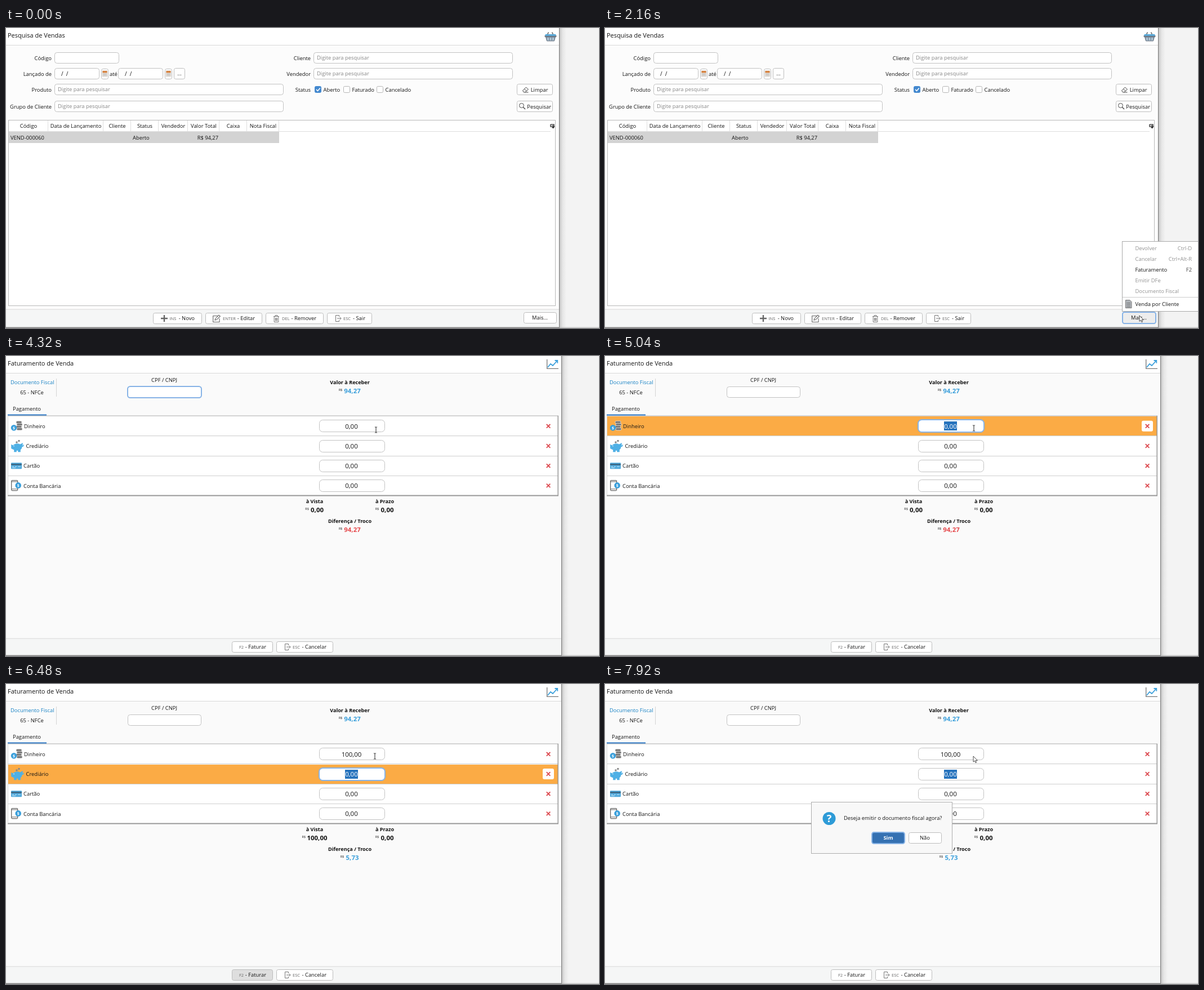
Recreate the animation shown at these times as an HTML page. Size 1053x532 px, loop 8 s.

```html
<!DOCTYPE html>
<html lang="pt-BR">
<head>
<meta charset="utf-8">
<title>Faturamento de Venda</title>
<style>
html, body { margin: 0; width: 100%; height: 100%; overflow: hidden; background: #f3f3f3; }
svg { display: block; width: 1053px; height: 532px; }
text { font-family: "Open Sans", "Noto Sans", sans-serif; white-space: pre; }
</style>
</head>
<body>
<svg id="stage" viewBox="0 0 1053 532"></svg>
<script>
const STEP = 720, LOOP = 8000;
const INK = '#141414', GRAY = '#666', BLUE = '#3571b2', SKY = '#3a9fdb';
const stage = document.getElementById('stage');

// y is the middle of the capital letters; baselines sit on whole pixels
function text(x, y, label, { size = 9.4, color = INK, anchor = 'start', bold = false } = {}) {
  return `<text x="${x}" y="${Math.round(y + size * 0.36)}" font-size="${size}" fill="${color}"
    text-anchor="${anchor}" font-weight="${bold ? 700 : 400}">${label}</text>`;
}
const center = (x, y, label, opt) => text(x, y, label, { ...opt, anchor: 'middle' });
const right = (x, y, label, opt) => text(x, y, label, { ...opt, anchor: 'end' });
const rect = (x, y, w, h, fill, more = '') =>
  `<rect x="${x}" y="${y}" width="${w}" height="${h}" fill="${fill}" ${more}/>`;
const box = (x, y, w, h, r = 4, fill = '#fff', line = '#bdbdbd', weight = 1) =>
  rect(x + .5, y + .5, w - 1, h - 1, fill, `rx="${r}" stroke="${line}" stroke-width="${weight}"`);
const path = (d, line, weight = 1, fill = 'none') =>
  `<path d="${d}" stroke="${line}" stroke-width="${weight}" fill="${fill}"/>`;
const circle = (x, y, r, fill, more = '') => `<circle cx="${x}" cy="${y}" r="${r}" fill="${fill}" ${more}/>`;
const at = (x, y, content) => `<g transform="translate(${x} ${y})">${content}</g>`;

const focusRing = (x, y, w, h, r, fill) => box(x - .5, y - .5, w + 1, h + 1, r + .5, fill, '#87b3e6', 2);

function input(x, y, w, h, { hint = '', focused = false, r = 4 } = {}) {
  return (focused ? focusRing(x, y, w, h, r, '#fff') : box(x, y, w, h, r, '#fff', '#c2c2c2'))
    + text(x + 6, y + h / 2, hint, { color: '#858585' });
}

const pointer = (x, y) =>
  at(x, y, path('M0 0V10.2L2.4 8.1 4 11.7 5.6 11 4.1 7.5H7.3Z', '#222', .8, '#fff'));
const beam = (x, y) =>
  at(x, y, path('M-2-5H-.6L0-4.4 .6-5H2M0-4.5V4.5M-2 5H-.6L0 4.4 .6 5H2', '#222'));
const clickHalo = (x, y) => circle(x, y, 10, '#f6e71d', 'opacity=".72"');

function windowFrame(title, edge, footer, body) {
  return `<defs><linearGradient id="shade"><stop stop-color="#c9c9c9"/>
    <stop offset=".45" stop-color="#e6e6e6"/><stop offset="1" stop-color="#f3f3f3"/></linearGradient></defs>`
    + rect(0, 0, 1053, 532, '#f3f3f3') + rect(edge, 0, 12, 532, 'url(#shade)')
    + rect(0, 0, edge, 532, body) + rect(0, 0, edge, 30, '#fff') + rect(0, 30, edge, 1, '#d9d9d9')
    + rect(0, footer, edge, 531 - footer, '#f5f6f6') + rect(0, footer - .5, edge, 1, '#dadada')
    + rect(edge - 1, 0, 1.2, 532, '#808080') + rect(0, 530.6, 1053, 1, '#b5b5b5')
    + rect(0, 530.6, edge, 1.4, '#858585') + text(3, 13, title, { size: 11 });
}

const icons = {
  basket: path('M3 8L7 .5M17 8L13 .5', '#777', 1.6) + rect(0, 6, 21, 3, '#6d7884', 'rx="1"')
    + path('M2 9H19L17 16H4Z', '#707b88', 1, '#8aa0b2') + rect(1, 4, 19, 3, '#57aadb', 'rx="1"')
    + path('M6 10V15M10.5 10V15M15 10V15', '#d5e4ee', 1.2),
  chart: path('M.7 0V16.3H21', '#777', 1.3) + path('M2 14L7 8 11 11 19 2M14.5 2H19.3V6.8', SKY, 1.8),
  calendar: rect(0, 0, 8, 10, '#e6e1dc', 'stroke="#c4bdb5" stroke-width=".6"') + rect(0, 0, 8, 3.5, '#d78442')
    + path('M1 5.5H7M1 7.7H7', '#aaa', .8),
  eraser: path('M1 7L7 1 11 5 5 10H3ZM4 4L8 8M5 10H11', '#444'),
  search: '<circle cx="4.5" cy="4.5" r="4" fill="none" stroke="#444"/>' + path('M7.3 7.3L11 11', '#444', 1.3),
  plus: path('M6 0V12M0 6H12', GRAY, 2.4),
  pencil: path('M9 1.5H.7V12.5H12V6M4 9L5 6.2 11 0 13.3 2.2 7 8.3Z', GRAY, 1.1),
  trash: path('M0 2.5H10M3 2V.5H7V2M1.2 3V12.5H8.8V3M3.5 5V10.5M5 5V10.5M6.5 5V10.5', '#777'),
  exit: path('M6.5 3V.5H.5V11.5H6.5V9M3 6H10M7.8 3.6L10.2 6 7.8 8.4', '#777'),
  sheet: path('M.5 .5H8L11 3.5V14.5H.5Z', '#777', 1, '#b3b8bd') + path('M2.5 5H9M2.5 7.5H9M2.5 10H9M2.5 12.5H9', '#666', .8),
  coins: [0, 4, 8, 12].map(y => rect(9 + y % 8 / 4, y, 10, 4.4, '#777', 'rx="2" stroke="#eee" stroke-width=".7"')).join('')
    + circle(5, 12, 5.2, SKY) + center(5, 12, '$', { size: 7, color: '#fff', bold: true }),
  pig: '<ellipse cx="11" cy="13" rx="8.5" ry="6.3" fill="#4fb0e5"/>'
    + path('M4 11L1 9.5V15L5 17M6 17V21H9V17M13 17V21H16V16M16 9L20 7 19 12M19 12Q22 12 22 9', '#4fb0e5', 1.6, '#4fb0e5')
    + circle(14, 2, 1.8, '#888') + circle(10, 4.5, 1.8, '#888') + circle(5, 11, .8, '#fff'),
  card: rect(0, 0, 19, 11, '#4fa9dc', 'rx="1"') + rect(0, 2, 19, 2.3, '#3b617c')
    + path('M2 7H5M7 7H10M12 7H17M2 9H8', '#d8eefa', .9),
  phone: rect(.7, .7, 11, 18, '#fff', 'rx="1.5" stroke="#666" stroke-width="1.3"') + path('M1 3H11M1 16H11', GRAY)
    + circle(12.7, 9.5, 5.3, SKY) + center(12.7, 9.5, '$', { size: 7, color: '#fff', bold: true }),
};

function actionButton(x, y, w, icon, iconX, key, keyX, label, end, fill = '#fff') {
  return box(x, y, w, 20, 3, fill) + (icon ? at(iconX, y + 4, icons[icon]) : '')
    + text(keyX, y + 10.5, key, { size: 7.5, color: '#666' }) + right(end, y + 10, '- ' + label);
}

function checkbox(x, label, checked) {
  return box(x, 103, 12, 12, 2, checked ? '#4489cf' : '#fff', checked ? '#4489cf' : '#b5b5b5')
    + (checked ? path(`M${x + 3} 109l2.5 2.6 4.3-5`, '#fff', 1.5) : '') + text(x + 15.5, 109.5, label);
}

function moreButton(step) {
  const pressed = step === 2;
  const fill = pressed ? BLUE : step === 1 || step === 3 ? '#ededed' : '#fff';
  return (step > 1 ? focusRing(919, 504, 59, 20, 3, fill) : box(919, 504, 59, 20, 3, fill))
    + center(948, 514, 'Mais...', { color: pressed ? '#fff' : INK, bold: pressed });
}

function menu(highlighted) {
  const entries = [['Devolver', 'Ctrl-D'], ['Cancelar', 'Ctrl+Alt-R'], ['Faturamento', 'F2'], ['Emitir DFe', ''], ['Documento Fiscal', '']];
  return rect(918.5, 378.5, 140, 124, '#fff', 'stroke="#aaa"')
    + (highlighted ? rect(919, 419, 134, 19, '#e4e4e4') + rect(918, 419, 3, 19, BLUE) : '')
    + entries.map(([name, key], i) => {
      const y = 391 + i * 19, color = i === 2 ? INK : '#929292';
      return text(941.5, y, name, { color }) + right(1042, y, key, { color: i === 2 ? '#444' : '#929292' });
    }).join('')
    + rect(919, 477, 134, 1, '#ccc') + at(924, 482, icons.sheet) + text(941.5, 489.5, 'Venda por Cliente');
}

function searchScreen(step) {
  const hint = 'Digite para pesquisar';
  const labels = [[81, 53, 'Código'], [81, 81, 'Lançado de'], [81, 109, 'Produto'], [81, 139, 'Grupo de Cliente'],
    [541, 53, 'Cliente'], [541, 81, 'Vendedor'], [541, 109, 'Status']];
  const columns = [['Código', 75], ['Data de Lançamento', 173], ['Cliente', 222], ['Status', 271],
    ['Vendedor', 323], ['Valor Total', 379], ['Caixa', 428], ['Nota Fiscal', 485]];
  let left = 5, header = '';
  for (const [name, edge] of columns) {
    header += center((left + edge) / 2, 174, name) + rect(edge - 1, 164, 1, 20, '#dedede');
    left = edge;
  }
  const date = x => input(x, 71, 80, 20) + text(x + 12, 81.5, '/  /', { size: 10 });
  const calendar = x => box(x, 72, 13, 19, 3) + at(x + 2.5, 76, icons.calendar);
  return windowFrame('Pesquisa de Vendas', 983, 499, '#fcfcfc')
    + at(956.5, 7, icons.basket)
    + labels.map(([x, y, name]) => right(x, y + .5, name)).join('')
    + input(86, 43, 115, 20) + date(86) + calendar(169) + text(184, 81.5, 'até') + date(199) + calendar(282)
    + box(298, 71, 20, 20, 3) + center(308, 81, '...')
    + input(86, 99, 407, 20, { hint }) + input(86, 129, 407, 20, { hint })
    + input(546, 43, 354, 20, { hint }) + input(546, 71, 354, 20, { hint })
    + checkbox(548, 'Aberto', true) + checkbox(599, 'Faturado') + checkbox(658, 'Cancelado')
    + box(907, 99, 64, 20, 3) + at(916.5, 104, icons.eraser) + right(962.5, 109.5, 'Limpar')
    + box(907, 129, 64, 20, 3) + at(911, 133, icons.search) + right(968, 139.5, 'Pesquisar')
    + box(4, 163, 972, 330, 0, '#fff', '#b9b9b9') + rect(5, 183, 962, 1, '#dedede') + header
    + path('M967 171H973V175.5H970M967 171V175H969M969 173H973M969.5 175L971.5 177.5 973.5 175Z', '#111', 1.2)
    + rect(5, 184, 480, 20, '#d3d3d3')
    + text(8, 194.5, 'VEND-000060') + text(225, 194.5, 'Aberto') + right(377, 194.5, 'R$ 94,27')
    + actionButton(261, 505, 87, 'plus', 275, 'INS', 290.5, 'Novo', 335)
    + actionButton(354, 505, 101, 'pencil', 367, 'ENTER', 385, 'Editar', 442)
    + actionButton(461, 505, 103, 'trash', 475, 'DEL', 490, 'Remover', 551)
    + actionButton(570, 505, 80, 'exit', 585, 'ESC', 599, 'Sair', 638)
    + moreButton(step)
    + (step >= 3 ? menu(step >= 4) : '')
    + (step === 2 ? clickHalo(949, 510) : step === 5 ? clickHalo(964, 431) : '')
    + (step >= 4 ? pointer(964, 431) : step ? pointer(949, 510) : '');
}

function money(x, y, label, value, color = '#111') {
  const half = value.length * 2.9;
  return center(x, y, label, { size: 9.1, bold: true, color: '#111' })
    + right(x + 1.5 - half, y + 13.5, 'R$', { size: 5.5 })
    + center(x + 4.5, y + 15.5, value, { size: 11.4, bold: true, color });
}

function paymentRow(i, step) {
  const [name, icon, iconTop, labelX] = [['Dinheiro', 'coins', 9, 32], ['Crediário', 'pig', 11, 35.5],
    ['Cartão', 'card', 5.5, 31], ['Conta Bancária', 'phone', 10, 31]][i];
  const y = 124.3 + i * 35.2, top = Math.round(y - 17);
  const current = step === 7 ? 0 : step >= 8 ? 1 : -1;
  const selected = i === current, active = selected && step < 10;
  const value = i === 0 && step >= 8 ? '100,00' : '0,00';
  return rect(4, top, 976, 34, active ? '#fbab45' : '#fff') + rect(4, top + 34, 976, 1, '#cfcfcf')
    + at(9, y - iconTop, icons[icon]) + text(labelX, y + .3, name)
    + input(556, Math.round(y) - 11, 117, 22, { focused: active, r: 6 })
    + (selected ? rect(602, Math.round(y) - 8, 23, 16, '#2673bd') : '')
    + center(613.5, y + .3, value, { size: 11.5, color: selected ? '#fff' : INK })
    + (active ? rect(953, y - 9.5, 20, 19, '#fff', 'rx="3"') : '')
    + path(`M959.8 ${y - 3.3}l6.6 6.6m0-6.6l-6.6 6.6`, '#dc4a50', 1.8);
}

function dialog(pressed) {
  return rect(366.5, 209.5, 250, 91, '#f8f8f8', 'stroke="#adadad"')
    + circle(398, 238.5, 11.5, '#2e9bd7') + center(398, 238.5, '?', { size: 18, color: '#fff', bold: true })
    + text(424, 237.5, 'Deseja emitir o documento fiscal agora?')
    + focusRing(474, 263, 58, 20, 3, pressed ? BLUE : '#4a87c7')
    + center(503, 273, 'Sim', { color: '#fff', bold: true })
    + box(539, 263, 59, 20, 3) + center(568, 273, 'Não');
}

function billingScreen(step) {
  const paid = step >= 8;
  return windowFrame('Faturamento de Venda', 987, 501, '#fafafa')
    + at(960, 6, icons.chart)
    + text(8, 47, 'Documento Fiscal', { color: '#1681c4' }) + center(46, 64.5, '65 - NFCe') + rect(89, 40, 1, 32, '#d4d4d4')
    + center(281, 42.5, 'CPF / CNPJ') + input(216, 54, 131, 20, { focused: step === 6 })
    + money(610.5, 46.5, 'Valor à Receber', '94,27', SKY)
    + text(12, 93.5, 'Pagamento') + rect(3, 105.5, 978, 1.2, '#bcbcbc') + rect(3, 103.5, 69, 2, '#2f78c4')
    + [0, 1, 2, 3].map(i => paymentRow(i, step)).join('')
    + rect(3, 246.5, 978, 2, '#999') + rect(979.5, 106, 1.5, 142, '#999') + rect(3, 107, 1, 140, '#d8d8d8')
    + money(548, 257.5, 'à Vista', paid ? '100,00' : '0,00') + money(672.5, 257.5, 'à Prazo', '0,00')
    + money(610.5, 292.5, 'Diferença / Troco', paid ? '5,73' : '94,27', paid ? SKY : '#e5484b')
    + actionButton(401, 506, 73, '', 0, 'F2', 414, 'Faturar', 462, step === 9 ? '#dedede' : '#fff')
    + actionButton(480, 506, 101, 'exit', 495, 'ESC', 509, 'Cancelar', 569)
    + (step >= 10 ? dialog(step === 11) + pointer(654, 128) : step === 6 ? beam(657, 131) : beam(655, 128));
}

let shown = -1;
function update(time) {
  const step = Math.floor(time % LOOP / STEP);
  if (step !== shown) {
    stage.innerHTML = step < 6 ? searchScreen(step) : billingScreen(step);
    shown = step;
  }
}

const start = performance.now();
function tick() {
  update(performance.now() - start);
  requestAnimationFrame(tick);
}
tick();
</script>
</body>
</html>
```
